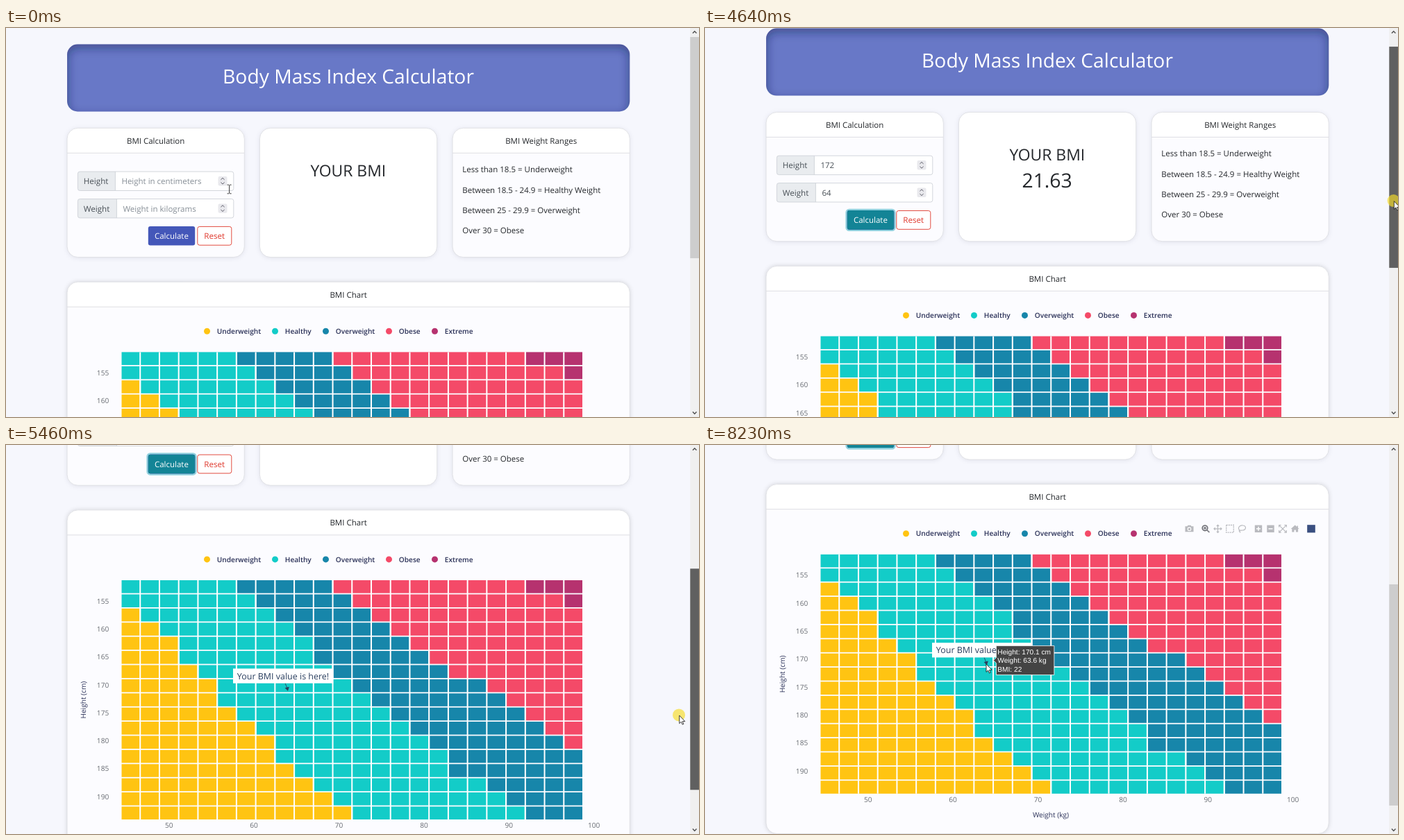
An HTML page for the animation above (9050 ms loop, 998 px wide and 561 px high).

```html
<!DOCTYPE html>
<html lang="en">
<head>
<meta charset="utf-8">
<title>Body Mass Index Calculator</title>
<style>
html, body { margin: 0; width: 100%; height: 100%; overflow: hidden; background: #f6f7fd; }
svg { display: block; width: 998px; height: 561px; }
text { font-family: "Open Sans", "Noto Sans", sans-serif; text-rendering: geometricPrecision; white-space: pre; }
#tip text { font-family: "Liberation Sans", Arial, sans-serif; }
.card { filter: drop-shadow(0 1px 3px rgba(20, 20, 60, .1)); }
.deep { filter: drop-shadow(0 0 3px rgba(0, 0, 0, .16)); }
</style>
</head>
<body>
<svg id="stage" viewBox="0 0 998 561" xmlns="http://www.w3.org/2000/svg"></svg>
<script>
const LOOP = 9050;
const INK = '#24272b', NAVY = '#2a3057', GREY = '#b9babf';
const COLORS = ['#ffc412', '#13ccc8', '#1786aa', '#f44a68', '#b6326f'];
const NAMES = ['Underweight', 'Healthy', 'Overweight', 'Obese', 'Extreme'];
const GRID = { x: 166.5, y: 467.4, dx: 27.73, dy: 20.4, cols: 24, rows: 17 };
// first column of the healthy, overweight, obese and extreme runs, per row
const RUNS = [
  [0, 0, 1, 2, 3, 3, 4, 5, 5, 6, 7, 8, 8, 9, 10, 11, 12],
  [6, 7, 8, 9, 10, 10, 11, 12, 13, 14, 15, 16, 17, 17, 19, 20, 21],
  [11, 12, 13, 14, 15, 16, 17, 19, 20, 21, 22, 23],
  [21, 23]
];

const rect = (x, y, w, h, fill, more = '') =>
  `<rect x="${x}" y="${y}" width="${w}" height="${h}" fill="${fill}" ${more}/>`;
const label = (x, y, str, { size = 11.5, fill = INK, anchor = 'start', more = '' } = {}) =>
  `<text x="${x}" y="${y + size * .36}" font-size="${size}" fill="${fill}" text-anchor="${anchor}" ${more}>${str}</text>`;
const mid = (x, y, str, o = {}) => label(x, y, str, { ...o, anchor: 'middle' });
const line = (d, stroke, w, more = '') =>
  `<path d="${d}" fill="none" stroke="${stroke}" stroke-width="${w}" ${more}/>`;

function card(x, y, w, h, title, body, cls = 'card') {
  const r = 15.5;
  let out = rect(x, y, w, h, body, `rx="${r}" class="${cls}"`);
  if (title) {
    out += `<path d="M${x} ${y + 36}V${y + r}a${r} ${r} 0 0 1 ${r}-${r}h${w - 2 * r}a${r} ${r} 0 0 1 ${r} ${r}V${y + 36}Z" fill="#fff"/>`
      + line(`M${x} ${y + 36}h${w}`, '#dfdfe3', 1) + mid(x + w / 2, y + 18.3, title);
  }
  return out + rect(x, y, w, h, 'none', `rx="${r}" stroke="#dedfe4" stroke-width=".9"`);
}

function field(id, y, split, name, hint) {
  const cy = y + 13.9;
  return rect(103.4, y, 224.4, 27.4, '#fff', 'rx="3"')
    + `<path d="M${split} ${y}H106.4a3 3 0 0 0-3 3v21.4a3 3 0 0 0 3 3H${split}Z" fill="#e9ecef"/>`
    + rect(103.4, y, 224.4, 27.4, 'none', 'rx="3" stroke="#ced2d8" stroke-width=".9"')
    + line(`M${split} ${y}v27.4`, '#ced2d8', .9)
    + label(111.8, cy, name, { fill: '#495057', size: 11.6 })
    + `<g id="${id}Ring">` + rect(split - 1, y - 1, 329.8 - split, 29.4, 'none', 'rx="4" stroke="#e95420" stroke-opacity=".27" stroke-width="3"')
    + rect(split, y, 327.8 - split, 27.4, 'none', 'rx="2" stroke="#f4aa90" stroke-width=".9"') + '</g>'
    + label(split + 9, cy, hint, { fill: '#868e96', more: `id="${id}Hint"` })
    + label(split + 9, cy, '', { fill: '#495057', more: `id="${id}Val"` })
    + rect(split + 9, cy - 6.5, .9, 13, '#222', `id="${id}Caret"`)
    + rect(305.5, cy - 7, 13, 13.4, '#e9e9ed', 'rx="2"')
    + line(`M309.4 ${cy - 2.2}l2.6-2.5 2.6 2.5M309.4 ${cy + 1.6}l2.6 2.5 2.6-2.5`, '#5b5b66', 1);
}

function chart() {
  const { x, y, dx, dy, cols, rows } = GRID, right = x + cols * dx - 2, bottom = y + rows * dy - 1.8;
  let out = card(88, 366.2, 810.3, 504, 'BMI Chart', '#fcfcff', 'deep');
  [289.5, 387.5, 460.5, 551.5, 617.5].forEach((cx, i) => {
    out += `<circle cx="${cx}" cy="437.3" r="4.5" fill="${COLORS[i]}"/>`
      + label(cx + 14.3, 437.3, NAMES[i], { size: 10.15, fill: NAVY, more: 'font-weight="600"' });
  });
  for (let r = 0; r < rows; r++) {
    const cuts = [0, ...RUNS.map(run => run[r] ?? cols), cols];
    COLORS.forEach((c, i) => {
      const n = cuts[i + 1] - cuts[i];
      if (n) out += rect(x + cuts[i] * dx, y + r * dy, n * dx - 2, dy - 1.8, c);
    });
  }
  let bars = '';
  for (let c = 1; c < cols; c++) bars += `M${x + c * dx - 1} ${y}V${bottom}`;
  out += line(bars, '#fff', 2);
  for (let i = 0; i < 8; i++)
    out += label(148.2, 497.3 + i * 40.32, 155 + i * 5, { size: 10.1, fill: '#666a70', anchor: 'end' });
  for (let i = 0; i < 6; i++)
    out += mid(234.7 + i * 122.4, 820.8, 50 + i * 10, { size: 10.1, fill: '#666a70' });
  out += mid(498, 842.9, 'Weight (kg)', { size: 10.14, fill: NAVY })
    + `<g transform="translate(111.5 640) rotate(-90)">${mid(0, 0, 'Height (cm)', { size: 10.14, fill: NAVY })}</g>`;
  out += '<g id="note">' + line('M402 616l3.4 8', '#2a3f5f', .9)
    + '<path d="M401.6 622.6l6.3-1.5-2 5.9Z" fill="#2a3f5f"/>'
    + rect(327, 594.8, 144.2, 21.2, '#fff') + mid(399, 605.4, 'Your BMI value is here!', { size: 12.48, fill: '#2a3f5f' }) + '</g>';
  return out + modebar();
}

function modebar() {
  const at = (x, s) => `<g transform="translate(${x} 430.4)">${s}</g>`;
  const frame = d => line(d, GREY, 1.2);
  return '<g id="tools">'
    + at(697.5, `<path d="M-6-3.5h3l1-1.5h4l1 1.5h3v8H-6Z" fill="${GREY}"/><circle cy=".4" r="2.3" fill="${GREY}" stroke="#fff" stroke-width="1.1"/>`)
    + at(721, `<circle cx="-1" cy="-1" r="3.7" fill="none" stroke="#77787e" stroke-width="1.9"/>` + line('M1.8 1.8L5.4 5.2M-2.8-1h3.6M-1-2.8V.8', '#77787e', 1.7))
    + at(738.5, frame('M-5.5 0H5.5M0-5.5V5.5M-3.8-1.7L-5.5 0-3.8 1.7M3.8-1.7L5.5 0 3.8 1.7M-1.7-3.8L0-5.5 1.7-3.8M-1.7 3.8L0 5.5 1.7 3.8'))
    + at(756, line('M-5.3-5.3H5.3V5.3H-5.3Z', GREY, 1.4, 'stroke-dasharray="2 1.1"'))
    + at(773.5, frame('M-3.6 2.2C-7.5-2-2.5-5.8 1.4-4.8 6.5-4 6 1.8.6 2.2-2.8 2.6-5 1.6-4 3.6-3.3 4.7-2.3 4-3 5.6'))
    + at(797, rect(-5.2, -5.2, 10.4, 10.4, GREY) + line('M-3 0H3M0-3V3', '#fff', 1.5))
    + at(814.5, rect(-5.2, -5.2, 10.4, 10.4, GREY) + line('M-3 0H3', '#fff', 1.5))
    + at(832, frame('M-5.3-2.3V-5.3H-2.3M2.3-5.3H5.3V-2.3M5.3 2.3V5.3H2.3M-2.3 5.3H-5.3V2.3M-4.5-4.5L4.5 4.5M4.5-4.5L-4.5 4.5'))
    + at(849.7, `<path d="M-6 .3L0-5.2 2.8-2.7V-4.4H4.3V-1.2L6 .3H4.4V4.8H1.2V1.6H-1.2V4.8H-4.4V.3Z" fill="${GREY}"/>`)
    + at(873, rect(-5.8, -5.6, 11.6, 11.2, '#3a4f80')) + '</g>';
}

const stage = document.getElementById('stage');
stage.innerHTML = `<defs>
  <clipPath id="bannerClip"><rect x="88" y="23.5" width="810.3" height="97" rx="15"/></clipPath>
  <filter id="soft" x="-10%" y="-50%" width="120%" height="200%"><feGaussianBlur stdDeviation="7"/></filter></defs>`
  + rect(0, 0, 998, 561, '#f6f7fd')
  + '<g id="page">'
  + rect(88, 23.5, 810.3, 97, '#6878c7', 'rx="15"')
  + '<g clip-path="url(#bannerClip)">' + rect(82, 21.5, 822.3, 111, 'none', 'rx="20" stroke="#15204f" stroke-opacity=".5" stroke-width="14" filter="url(#soft)"') + '</g>'
  + mid(493, 69.4, 'Body Mass Index Calculator', { size: 28.2, fill: '#fff' })
  + card(88, 144.3, 255.3, 186.3, 'BMI Calculation', '#fcfcff')
  + card(365.4, 144.3, 255.3, 186.3, '', '#fff')
  + card(643, 144.3, 255.3, 186.3, 'BMI Weight Ranges', '#fcfcff')
  + field('h', 207.1, 157.4, 'Height', 'Height in centimeters')
  + field('w', 246.5, 159.4, 'Weight', 'Weight in kilograms')
  + '<g id="btnRing">' + rect(203.6, 284.8, 69.8, 30, 'none', 'rx="4" stroke="#3ab0c3" stroke-opacity=".55" stroke-width="2.4"') + '</g>'
  + rect(204.8, 286, 67.4, 27.6, '#4457b9', 'rx="3"')
  + rect(204.8, 286, 67.4, 27.6, '#3f50a4', 'rx="3" id="btnHover"')
  + rect(204.8, 286, 67.4, 27.6, '#138496', 'rx="3" id="btnOn"')
  + mid(238.4, 299.9, 'Calculate', { fill: '#fff' })
  + rect(275.8, 286.4, 49, 26.8, '#fff', 'rx="3" stroke="#df382c" stroke-width=".9"')
  + mid(300.2, 299.9, 'Reset', { fill: '#df382c', size: 11.6 })
  + mid(492.8, 206, 'YOUR BMI', { size: 22.9 })
  + mid(492.6, 243.2, '21.63', { size: 28.3, more: 'id="bmi"' })
  + ['Less than 18.5 = Underweight', 'Between 18.5 - 24.9 = Healthy Weight', 'Between 25 - 29.9 = Overweight', 'Over 30 = Obese']
    .map((s, i) => label(657.3, 204.2 + i * 29.25, s)).join('')
  + chart()
  + '<g id="tip"><path d="M0 0L4-4V-21H87.5V21H4V4Z" fill="#444" stroke="#fff" stroke-width=".8"/>'
  + [0, 1, 2].map(i => label(6, -12.5 + i * 12.5, '', { size: 10.14, fill: '#fff', more: `id="tip${i}"` })).join('') + '</g>'
  + '</g>'
  + rect(985.3, 0, 12.7, 561, '#f0f0f0')
  + rect(985.3, 13, 12.7, 319, '#cdcdcd', 'id="thumb"')
  + line('M988.9 7.6l2.8-2.8 2.8 2.8M988.9 553.6l2.8 2.8 2.8-2.8', '#505050', 1.4)
  + '<circle id="press" r="9" fill="#f6dc28" fill-opacity=".66"/>'
  + '<g id="arrow"><path d="M0 0V11.6L2.7 9.2 4.4 13.1 6.1 12.4 4.5 8.6H8.1Z" fill="#fff" stroke="#111" stroke-width=".8"/></g>'
  + '<g id="hand"><path d="M-1.1 1a1.1 1.1 0 0 1 2.2 0V5l1.9.3 1.8.6 1.5 1V10.7L5.3 15.2H0L-2.8 10.4-3.9 8.2a1 1 0 0 1 1.6-1L-1.1 8.5Z" fill="#fff" stroke="#111" stroke-width=".8"/></g>'
  + '<g id="beam">' + line('M-3-6.3h2l1 .8 1-.8h2M0-5.5V5.5M-3 6.3h2l1-.8 1 .8h2', '#222', .9) + '</g>';

const ui = {};
stage.querySelectorAll('[id]').forEach(el => ui[el.id] = el);
const set = (id, name, v) => ui[id].setAttribute(name, v);
const fade = (id, v) => set(id, 'opacity', +v);
const ramp = (t, from, ms = 150) => Math.min(1, Math.max(0, (t - from) / ms));

// monotone cubic through [time, value, ...] keys
function track(keys, t, c = 1) {
  const last = keys.length - 1;
  if (t <= keys[0][0]) return keys[0][c];
  if (t >= keys[last][0]) return keys[last][c];
  const slope = i => (keys[i + 1][c] - keys[i][c]) / (keys[i + 1][0] - keys[i][0]);
  const tangent = i => {
    if (i === 0 || i === last) return 0;
    const a = slope(i - 1), b = slope(i);
    return a * b <= 0 ? 0 : 2 * a * b / (a + b);
  };
  let i = 0;
  while (keys[i + 1][0] < t) i++;
  const h = keys[i + 1][0] - keys[i][0], u = (t - keys[i][0]) / h, v = 1 - u;
  return keys[i][c] * v * v * (1 + 2 * u) + keys[i + 1][c] * u * u * (3 - 2 * u)
    + h * (tangent(i) * u * v * v - tangent(i + 1) * u * u * v);
}

const SCROLL = [[4570, 0], [4640, 22.5], [4980, 186], [5240, 235.2], [5660, 297.2], [5880, 309.6]];
const MOUSE = [
  [10, 321.6, 232.5], [300, 196, 229.5], [2830, 196, 229.5], [3010, 114.5, 266], [3140, 180, 296],
  [3260, 255.5, 292.5], [3740, 255.5, 292.5], [4100, 640, 262], [4460, 992, 237], [4560, 992, 239],
  [4640, 992.3, 249.5], [4980, 978.8, 343.7], [5240, 973.8, 368.6], [5660, 966.3, 404.8], [5880, 963, 412],
  [6650, 963, 412], [7000, 740, 372], [7300, 450, 325], [7540, 402.5, 318.3], [7580, 402.5, 318.3],
  [7640, 403.5, 315.8], [8170, 403.5, 315.8], [8230, 405, 315.8]
];
const PRESSES = [[300, 430], [3450, 3580], [4520, 6660]];

function typed(id, t, keys, caretOn, width) {
  const str = keys.filter(k => t >= k[0]).map(k => k[1]).join('');
  ui[id + 'Val'].textContent = str;
  fade(id + 'Hint', !str);
  fade(id + 'Caret', caretOn);
  set(id + 'Caret', 'x', width + str.length * 6.57);
}

function tooltip(x, y, on) {
  const c = Math.floor((x - GRID.x) / GRID.dx), r = Math.floor((y - GRID.y) / GRID.dy);
  const hit = on && c >= 0 && c < GRID.cols && r >= 0 && r < GRID.rows;
  fade('tip', hit);
  if (!hit) return;
  const cm = Math.floor((60 + r) * 25.4) / 10, kg = (100 + 5 * c) / 2.2;
  set('tip', 'transform', `translate(${GRID.x + (c + 1) * GRID.dx - .7} ${GRID.y + (r + .5) * GRID.dy - .2})`);
  [`Height: ${cm.toFixed(1)} cm`, `Weight: ${kg.toFixed(1)} kg`, `BMI: ${Math.round(kg / (cm / 100) ** 2)}`]
    .forEach((s, i) => ui['tip' + i].textContent = s);
}

function draw(t) {
  const s = track(SCROLL, t), x = track(MOUSE, t, 1), y = track(MOUSE, t, 2);
  set('page', 'transform', `translate(0 ${-s})`);

  fade('hRing', ramp(t, 300) - ramp(t, 1760));
  fade('wRing', ramp(t, 1760) - ramp(t, 3450));
  typed('h', t, [[1100, '1'], [1290, '7'], [1500, '2']], (t >= 300 && t < 830) || (t >= 1100 && t < 1760), 166.4);
  typed('w', t, [[1910, '6'], [2170, '4']], t >= 1760 && t < 2680, 168.4);
  set('wVal', 'fill', t < 3450 ? '#222' : '#495057');

  fade('btnHover', ramp(t, 3200));
  fade('btnOn', ramp(t, 3450));
  fade('btnRing', ramp(t, 3450));
  fade('bmi', t >= 3590);
  fade('note', t >= 3590);

  const drag = t >= 4520 && t < 6660;
  set('thumb', 'y', 13 + s * .607);
  set('thumb', 'fill', drag ? '#606060' : x > 985 ? '#a6a6a6' : '#cdcdcd');

  const overChart = t > 6660 && x < 885;
  fade('tools', ramp(t, 6775, 300));
  tooltip(x, y + s, overChart);

  const inBox = (l, r, a, b) => x > l && x < r && y > a && y < b;
  const still = s === 0;
  const kind = still && inBox(205, 272, 286, 314) ? 'hand'
    : still && (inBox(157, 328, 207, 235) || inBox(159, 328, 246, 274)) ? 'beam' : 'arrow';
  ['arrow', 'hand', 'beam'].forEach(k => fade(k, k === kind));
  set(kind, 'transform', `translate(${x} ${y})`);
  fade('press', PRESSES.some(([a, b]) => t >= a && t < b));
  set('press', 'transform', `translate(${x - .7} ${y - .6})`);
}

const start = performance.now();
function tick() {
  draw((performance.now() - start) % LOOP);
  requestAnimationFrame(tick);
}
tick();
</script>
</body>
</html>
```
